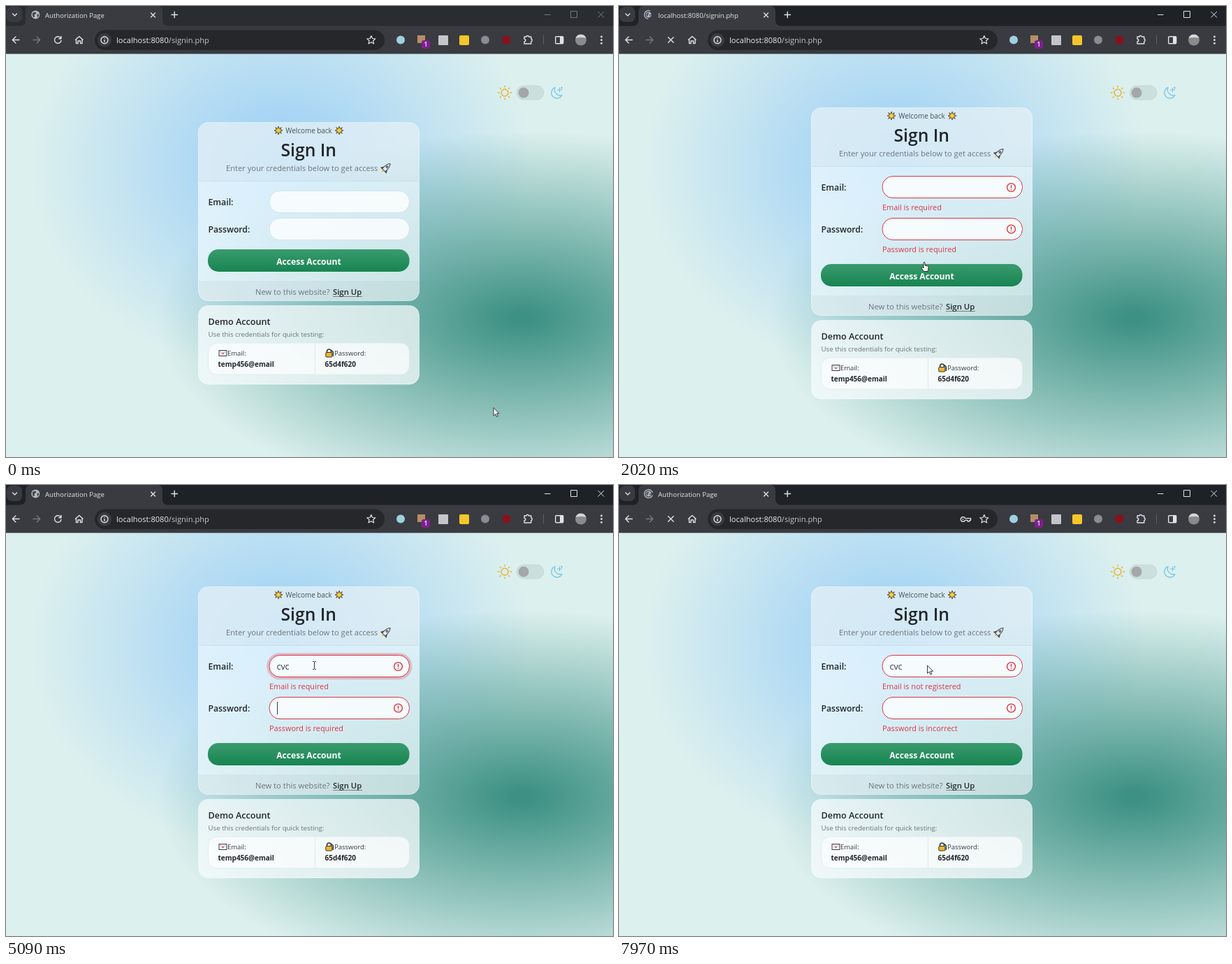
Write an HTML page that moves like this. It is 869 px wide and 645 px high and loops after 8 s.

```html
<!DOCTYPE html>
<html lang="en">
<head>
<meta charset="utf-8">
<title>Authorization Page</title>
<style>
  html, body { margin: 0; width: 100%; height: 100%; overflow: hidden; background: #dcf0ee; }
  svg { display: block; width: 869px; height: 645px; }
  text { font-family: "Open Sans", "Noto Sans", sans-serif; fill: #212529; white-space: pre; }
  .mid { text-anchor: middle; }
  .semi { font-weight: 600; }
  .bold { font-weight: 700; }
  .grey { fill: #6c757d; }
  .red { fill: #dc3545; font-size: 10.9px; }
  .line { fill: none; stroke: #dfe1e5; stroke-width: 1.4; stroke-linecap: round; stroke-linejoin: round; }
  .thin { fill: none; stroke-width: 1; }
  .field { fill: #fff; fill-opacity: .78; stroke: #d3e6ee; }
  .bad .field { stroke: #dc3545; }
  .alert { visibility: hidden; }
  .bad .alert { visibility: visible; }
</style>
</head>
<body>
<svg viewBox="0 0 869 645">
  <defs>
    <radialGradient id="blue" gradientUnits="userSpaceOnUse" r="1" gradientTransform="translate(395 228) scale(358 300)" cx="0" cy="0">
      <stop stop-color="#98cdf7"/>
      <stop offset="1" stop-color="#98cdf7" stop-opacity="0"/>
    </radialGradient>
    <radialGradient id="green" gradientUnits="userSpaceOnUse" r="1" gradientTransform="translate(738 446) scale(521 267)" cx="0" cy="0">
      <stop offset=".03" stop-color="#3d9184"/>
      <stop offset="1" stop-color="#3d9184" stop-opacity="0"/>
    </radialGradient>
    <linearGradient id="btn" x2="0" y2="1">
      <stop stop-color="#3a9b6e"/><stop offset="1" stop-color="#178451"/>
    </linearGradient>
    <linearGradient id="btnDark" x2="0" y2="1">
      <stop stop-color="#31865e"/><stop offset="1" stop-color="#126d43"/>
    </linearGradient>
    <g id="glow">
      <path d="M0-6L1.3-2.6 4.3-4.3 2.8-1.3 6 0 2.8 1.3 4.3 4.3 1.3 2.6 0 6-1.3 2.6-4.3 4.3-2.8 1.3-6 0-2.8-1.3-4.3-4.3-1.3-2.6Z" fill="#e9b32c" stroke="#3d4030" stroke-width=".8"/>
      <circle r="2.3" fill="#fbd04b"/>
    </g>
    <g id="warn" fill="none" stroke="#dc3545" stroke-width="1.4" stroke-linecap="round">
      <circle r="5.9"/><path d="M0-3V.6M0 2.9V3"/>
    </g>
  </defs>

  <rect width="869" height="645" fill="#dcf0ee"/>
  <rect y="68" width="869" height="577" fill="url(#blue)"/>
  <rect y="68" width="869" height="577" fill="url(#green)"/>

  <!-- browser chrome -->
  <rect id="strip" width="869" height="30"/>
  <path d="M20 28.5Q28 28.5 28 20V8Q28 0 36 0H216Q224 0 224 8V20Q224 28.5 232 28.5H869V68.5H0V28.5Z" fill="#393b40"/>
  <rect x="1" y="1" width="22" height="22" rx="7" fill="#393b40"/>
  <path class="line" d="M9.5 11L12.5 14 15.5 11M207.5 10L213.5 16M213.5 10L207.5 16M237 12.5H245.5M241.2 8.2V16.8"/>
  <path id="caption" class="thin" d="M771 12.5H779.5M808.5 7.5H817.5V16.5H808.5ZM847.5 8L856 16.5M856 8L847.5 16.5"/>
  <g transform="translate(42.3 12.5)">
    <g id="globe"><circle r="6" fill="#b9bcc1"/><path d="M-4.5-2Q-2-4.5 0-4 2-2 0-1-3 0-1 2-2 4-3 4-5 1-4.5-2ZM2 0Q4-2 5 0 4 4 2 4 3 2 2 0Z" fill="#45474c"/></g>
    <circle id="spin" class="line" r="6" style="stroke:#a9b2c0"/>
  </g>
  <text id="tab" x="56" y="17" font-size="9.6" style="fill:#e3e5e8"></text>
  <path class="line" d="M19 48.5H9.5M13.8 44L9.3 48.5 13.8 53M100.5 48V53.5H103V50H106.5V53.5H109V48M99.5 48.3L104.8 43.6 110 48.3"/>
  <path class="line" style="stroke:#74777c" d="M39 48.5H48.5M44.2 44L48.7 48.5 44.2 53"/>
  <path id="reload" class="line" d="M78 45.5A4.8 4.8 0 1 0 79 49.5M79 43.5V46.7H75.8"/>
  <path id="stop" class="line" d="M70.5 44.8L78 52.3M78 44.8L70.5 52.3"/>
  <rect x="127" y="34.5" width="415" height="28.5" rx="14.2" fill="#25272b"/>
  <circle cx="141" cy="48.8" r="10" fill="#393b40"/>
  <path class="line" d="M146 48.8A5 5 0 1 1 136 48.8 5 5 0 1 1 146 48.8M141 48.6V51.3M141 46.2V46.3"/>
  <text x="158" y="53" font-size="11.1" style="fill:#e8eaed">localhost:8080<tspan fill="#c3c6ca">/signin.php</tspan></text>
  <path id="key" class="line" d="M495.5 47.6A3.3 3.3 0 1 0 495.5 50.4H499V52H502V50.4H503.5V47.6ZM492 49H492.8"/>
  <path class="line" style="stroke-width:1.2" d="M522.8 42.5L524.5 46.5 528.8 46.9 525.6 49.7 526.6 53.9 522.8 51.7 519 53.9 520 49.7 516.8 46.9 521.1 46.5Z"/>
  <circle cx="565" cy="48.5" r="6" fill="#9fd0e0"/>
  <rect x="589" y="42" width="11" height="11" fill="#b58d68"/>
  <rect x="595" y="49" width="12" height="12" rx="3" fill="#80208f"/>
  <text class="mid semi" x="601" y="58.3" font-size="8.5" style="fill:#fff">1</text>
  <rect x="619" y="42" width="14" height="14" rx="1" fill="#c3c5ca"/>
  <rect x="649" y="42" width="14" height="14" rx="2" fill="#f7c52b"/>
  <circle cx="686" cy="48.5" r="6" fill="#898c91"/>
  <circle cx="716.5" cy="48.5" r="6" fill="#8d0f1b"/>
  <path class="line" d="M742 44H744.8A1.9 1.9 0 0 1 748.5 44H751.8V47A1.9 1.9 0 0 1 751.8 50.7V54H742V50.8A1.8 1.8 0 0 0 742 47.2Z"/>
  <path d="M769.5 41.5V55" stroke="#5a5d62"/>
  <rect class="line" x="786.7" y="43.7" width="11" height="10" rx="1"/>
  <path d="M793 43.7H797.7V53.7H793Z" fill="#dfe1e5"/>
  <circle cx="823" cy="48.5" r="8" fill="#898b8c"/>
  <path d="M815.5 46A8 8 0 0 1 830.5 46Q824 44 815.5 46Z" fill="#d5d6d6"/>
  <g fill="#dfe1e5"><circle cx="852.5" cy="44" r="1.4"/><circle cx="852.5" cy="48.7" r="1.4"/><circle cx="852.5" cy="53.4" r="1.4"/></g>

  <!-- theme switch -->
  <g fill="none" stroke="#ecb32e" stroke-width="1.5" stroke-linecap="round">
    <circle cx="714" cy="124" r="5"/><g id="rays"></g>
  </g>
  <rect x="731" y="114" width="39" height="20" rx="10" fill="#cbdfdd" stroke="#c2d6d5" stroke-width=".8"/>
  <circle cx="741" cy="124" r="7.5" fill="#a4a7a8"/>
  <g fill="none" stroke="#70c4ea" stroke-width="1.3" stroke-linecap="round" stroke-linejoin="round">
    <path d="M786 116.5A8 8 0 1 0 796 127.5 8.2 8.2 0 0 1 786 116.5Z"/>
    <path d="M792.5 117V123M789.5 120H795.5M795.5 116V118M794.5 117H796.5" stroke-width="1.1"/>
  </g>

  <!-- sign-in card -->
  <g id="page">
    <rect id="card" x="275.5" width="316" rx="14" fill="#f0fbff" fill-opacity=".72" stroke="#f4fbfd" stroke-opacity=".6"/>
    <g id="upper">
      <path d="M276 250.5V180.5A14 14 0 0 1 290 166.5H577A14 14 0 0 1 591 180.5V250.5Z" fill="#212529" fill-opacity=".03"/>
      <path d="M276 250.5H591" stroke="#212529" stroke-opacity=".06"/>
      <use href="#glow" x="390" y="178"/><use href="#glow" x="477" y="178"/>
      <text class="mid" x="433.5" y="182" font-size="9.9" style="fill:#495057">Welcome back</text>
      <text class="mid semi" x="433.3" y="215.3" font-size="24.7">Sign In</text>
      <text class="grey" x="315" y="236" font-size="11.15">Enter your credentials below to get access</text>
      <g transform="translate(544 231.5) rotate(45)" stroke="#3c4247" stroke-linejoin="round">
        <path d="M-3 1L-5.5 5-2.5 4.5M3 1L5.5 5 2.5 4.5" fill="#d3545c"/>
        <path d="M0-8.5Q4-4.5 2.8 4.8H-2.8Q-4-4.5 0-8.5Z" fill="#dfe9ee"/>
        <circle cy="-2" r="1.3" fill="#79bfe5"/><path d="M-1.5 5L0 8.5 1.5 5Z" fill="#efaa35" stroke="none"/>
      </g>
      <text class="semi" x="289.5" y="285.2" font-size="12.3">Email:</text>
      <rect id="mailRing" x="375" y="263" width="204.5" height="34.5" rx="17" fill="none" stroke="#dc3545" stroke-opacity=".27" stroke-width="3.5"/>
      <rect class="field" x="377" y="264.5" width="200.5" height="31" rx="15"/>
      <text id="mail" x="387.5" y="285" font-size="12.4" style="fill:#343a40"></text>
      <use class="alert" href="#warn" x="561.5" y="280.5"/>
      <text id="mailErr" class="red alert" x="377" y="313"></text>
    </g>
    <text class="semi" x="289.5" y="324.3" font-size="12.2">Password:</text>
    <rect id="passRing" x="375" y="301.8" width="204.5" height="34.5" rx="17" fill="none" stroke="#dc3545" stroke-opacity=".27" stroke-width="3.5"/>
    <rect class="field" x="377" y="303.5" width="200.5" height="31" rx="15"/>
    <g id="dots" fill="#343a40"></g>
    <use class="alert" href="#warn" x="561.5" y="319"/>
    <text id="passErr" class="red alert" x="377" y="351.5"></text>
    <path id="caret" d="M0-9V9" stroke="#343a40"/>

    <g id="lower">
      <path d="M276 393H591V407A14 14 0 0 1 577 421H290A14 14 0 0 1 276 407Z" fill="#212529" fill-opacity=".04"/>
      <rect id="btnRing" x="287.5" y="346.5" width="291.5" height="35" rx="17" fill="none" stroke="#6bbb99" stroke-opacity=".85" stroke-width="3.5"/>
      <rect x="289" y="348" width="288.5" height="32" rx="15" fill="url(#btn)"/>
      <rect id="dark" x="289" y="348" width="288.5" height="32" rx="15" fill="url(#btnDark)"/>
      <text class="mid bold" x="433.5" y="369.5" font-size="12.1" style="fill:#fff">Access Account</text>
      <text class="grey" x="357" y="412.7" font-size="11.2">New to this website?</text>
      <text class="semi" x="468" y="412.7" font-size="11.3">Sign Up</text>
      <path d="M468 415.5H510" stroke="#212529" stroke-opacity=".5"/>

      <rect x="275.5" y="428.5" width="316" height="112.5" rx="14" fill="#f8fcfe" fill-opacity=".73" stroke="#f4fbfd" stroke-opacity=".6"/>
      <text class="semi" x="289.5" y="456" font-size="12.6">Demo Account</text>
      <text class="grey" x="289.5" y="473" font-size="9.7">Use this credentials for quick testing:</text>
      <rect x="289.5" y="482" width="288" height="45" rx="13" fill="#fff" fill-opacity=".68" stroke="#dfeaec" stroke-opacity=".8"/>
      <path d="M442.5 482V527" stroke="#e1ebec"/>
      <rect x="305" y="492.5" width="11" height="8" fill="#eef1f3" stroke="#3c4247"/>
      <path d="M305.5 493L310.5 497 315.5 493" fill="none" stroke="#9ba5ad" stroke-width=".8"/>
      <circle cx="310.5" cy="497" r="1.3" fill="#e0575c"/>
      <text x="317" y="500" font-size="9.5" style="fill:#343a40">Email:</text>
      <text class="bold" x="303.5" y="515.7" font-size="10">temp456@email</text>
      <path d="M459.5 496V494A3 3 0 0 1 465.5 494V496" fill="none" stroke="#33352f" stroke-width="1.6"/>
      <rect x="457.8" y="495.5" width="9" height="6.5" rx="1" fill="#f0b42e" stroke="#33352f"/>
      <path d="M466 492.5L468.3 495V501" fill="none" stroke="#33352f" stroke-width="1.5"/>
      <text x="470" y="500" font-size="9.5" style="fill:#343a40">Password:</text>
      <text class="bold" x="456.5" y="515.7" font-size="10">65d4f620</text>
    </g>
  </g>

  <g id="pointer">
    <path id="arrow" d="M0 0V11.5L2.6 9 4.5 13 6.3 12.2 4.5 8.3H8Z" fill="#fff" stroke="#222" stroke-width=".9" stroke-linejoin="round"/>
    <path id="hand" d="M-1 1Q0-1 1 1V5L5.5 6Q6.5 6.5 6 9L5 13.5H-.5L-3.8 9Q-4 7-2.5 7.5L-1 9Z" fill="#fff" stroke="#222" stroke-width=".9" stroke-linejoin="round"/>
    <path id="beam" d="M-2.5-5.5H-.8L0-5 .8-5.5H2.5M0-5V5M-2.5 5.5H-.8L0 5 .8 5.5H2.5" fill="none" stroke="#33383c"/>
  </g>
</svg>
<script>
const $ = id => document.getElementById(id);
const LOOP = 8000;
const FOCUS = 1090, LOAD = 1150, ERROR = 2020, TITLE = 2150, READY = 2650;
const CLICK = 3800, TAB1 = 5090, TAB2 = 6620, ENTER = 7290, REPLY = 7830, TITLE2 = 7900;
const PATH = [[60, 698, 574.5], [820, 437, 366], [2830, 437, 366], [3040, 448, 310], [3240, 441.5, 257.5], [3380, 441.5, 258]];
const MAIL = [[4270, 1], [4340, 2], [4540, 3]];
const PASS = [[5630, 1], [5720, 2], [5810, 3], [5910, 5], [6000, 6], [6090, 7]];

const clamp = (v, a = 0, b = 1) => Math.min(b, Math.max(a, v));
const smooth = v => v * v * (3 - 2 * v);
const fade = (t, start, ms = 150) => smooth(clamp((t - start) / ms));
const between = (t, a, b) => t >= a && t < b;
const stepAt = (table, t) => table.reduce((n, [at, value]) => t >= at ? value : n, 0);
const show = (id, on) => $(id).style.display = on ? '' : 'none';
const alpha = (id, v) => $(id).style.opacity = v;
const move = (id, x, y) => $(id).setAttribute('transform', `translate(${x} ${y})`);

$('rays').innerHTML = Array.from({ length: 8 }, (_, i) =>
  `<path d="M714 116V114.5" transform="rotate(${i * 45} 714 124)"/>`).join('');
$('dots').innerHTML = Array.from({ length: 7 }, (_, i) =>
  `<circle cx="${390 + i * 5.55}" cy="319.5" r="1.9"/>`).join('');

function pointerAt(t) {
  const i = PATH.findIndex(p => p[0] > t);
  if (i === 0) return PATH[0].slice(1);
  if (i < 0) return PATH[PATH.length - 1].slice(1);
  const [a, x, y] = PATH[i - 1], [b, x2, y2] = PATH[i];
  const k = smooth((t - a) / (b - a));
  return [x + (x2 - x) * k, y + (y2 - y) * k];
}

function drawChrome(t) {
  const active = t >= FOCUS;
  const loading = between(t, LOAD, READY) || t >= ENTER;
  const unnamed = between(t, LOAD, TITLE) || between(t, ENTER, TITLE2);
  $('strip').setAttribute('fill', active ? '#1e2126' : '#292c30');
  $('caption').style.stroke = active ? '#dfe1e4' : '#76797d';
  $('tab').textContent = unnamed ? 'localhost:8080/signin.php' : 'Authorization Page';
  show('reload', !loading);
  show('stop', loading);
  show('spin', loading);
  show('key', t >= PASS[0][0]);
  $('globe').setAttribute('transform', loading ? 'scale(.65)' : '');
  // the wheel rests between the click and the reply
  const turn = clamp(t, 0, 1720) + clamp(t - ERROR, 0, 670) + Math.max(0, t - ENTER);
  $('spin').setAttribute('stroke-dasharray', unnamed ? '19 19' : '32 6');
  $('spin').setAttribute('transform', `rotate(${(unnamed ? -1 : 1) * turn * .36})`);
}

function drawForm(t) {
  const bad = t >= ERROR, replied = t >= REPLY;
  $('page').setAttribute('class', bad ? 'bad' : '');
  $('card').setAttribute('y', bad ? 145.5 : 166.5);
  $('card').setAttribute('height', bad ? 297 : 255);
  move('upper', 0, bad ? -21 : 0);
  move('lower', 0, bad ? 21 : 0);

  const letters = stepAt(MAIL, t), dots = replied ? 0 : stepAt(PASS, t);
  $('mail').textContent = 'cvc'.slice(0, letters);
  $('mailErr').textContent = replied ? 'Email is not registered' : 'Email is required';
  $('passErr').textContent = replied ? 'Password is incorrect' : 'Password is required';
  [...$('dots').children].forEach((dot, i) => dot.style.display = i < dots ? '' : 'none');

  alpha('mailRing', fade(t, CLICK, 240) - fade(t, TAB1));
  alpha('passRing', fade(t, TAB1) - fade(t, TAB2));
  const pressed = replied ? 0 : fade(t, TAB2, 200);
  alpha('btnRing', pressed);
  alpha('dark', bad ? pressed : fade(t, 640));

  show('caret', between(t, CLICK, TAB2));
  if (t < TAB1) move('caret', 388 + letters * 6.1, 260);
  else move('caret', 388.5 + dots * 5.55, 319);
}

function drawPointer(t) {
  const [x, y] = pointerAt(t);
  const top = t < ERROR ? 348 : 369;
  const onButton = between(y, top, top + 32) && x < 578 || between(t, ERROR, 2100);
  const onField = between(t, ERROR, REPLY) && (between(y, 244, 275) || between(y, 303, 335));
  show('hand', onButton);
  show('beam', onField);
  show('arrow', !onButton && !onField);
  move('pointer', x, y);
}

function frame(now) {
  const t = now % LOOP;
  drawChrome(t);
  drawForm(t);
  drawPointer(t);
  requestAnimationFrame(frame);
}
frame(0);
</script>
</body>
</html>
```
